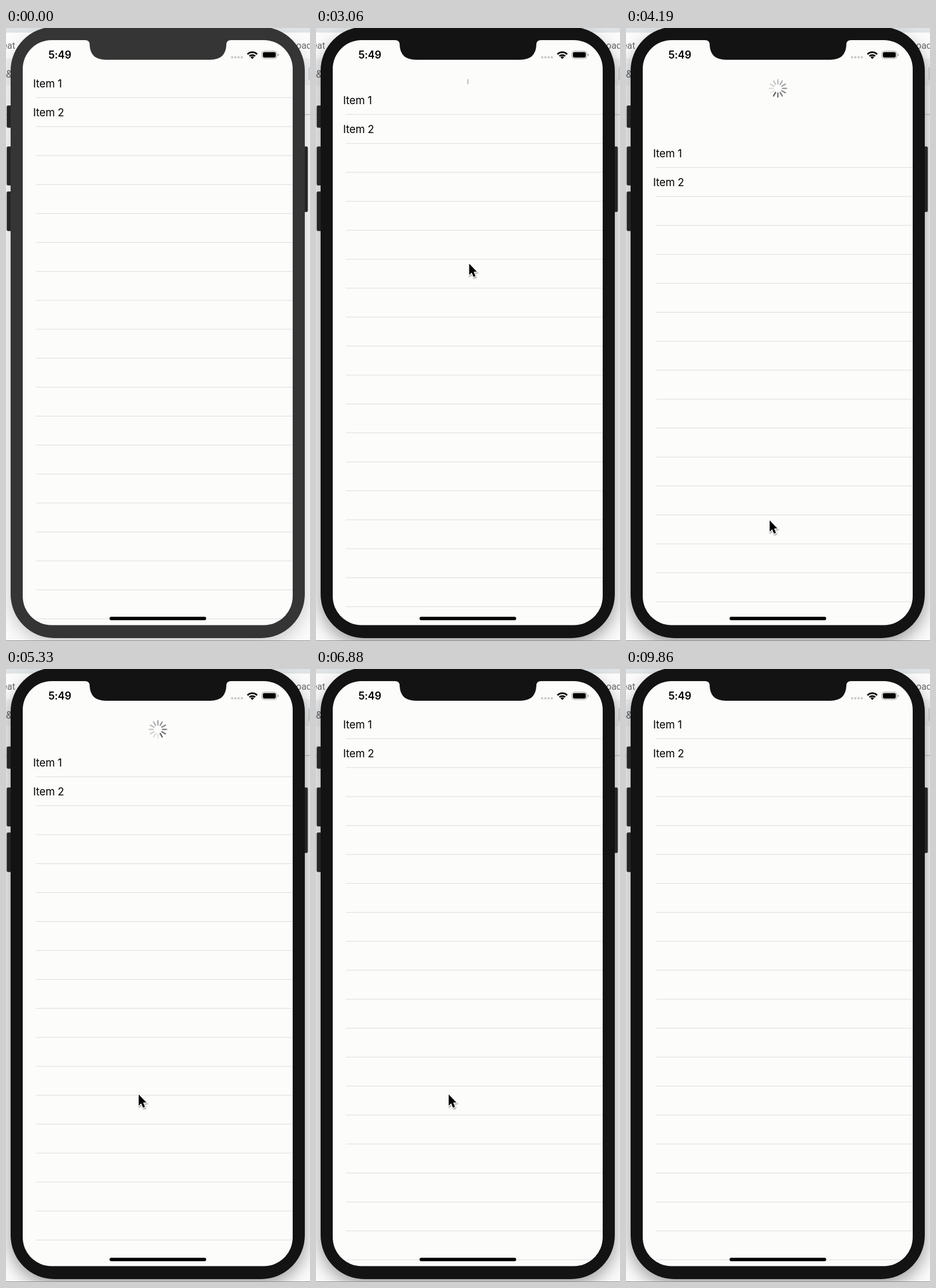
An HTML page that plays this animation: 527 by 1062 pixels, repeating every 9880 ms.

```html
<!DOCTYPE html>
<html lang="en">
<head>
<meta charset="utf-8">
<title>Pull to refresh</title>
<style>
  html, body { margin: 0; width: 100%; height: 100%; overflow: hidden; background: #fff; }
  svg { display: block; width: 100%; height: 100%; }
  .ui { font-family: Inter, "Liberation Sans", sans-serif; letter-spacing: -.2px; }
  .page { font-family: Roboto, Arial, sans-serif; fill: #686b6e; }
</style>
</head>
<body>
<svg viewBox="0 0 527 1062">
  <defs>
    <filter id="blur" x="-20%" y="-20%" width="140%" height="140%"><feGaussianBlur stdDeviation="15"/></filter>
    <filter id="soft" x="-50%" y="-50%" width="200%" height="200%"><feGaussianBlur stdDeviation="1"/></filter>
    <clipPath id="screenClip"><rect x="29" y="21" width="468" height="1013.5" rx="50"/></clipPath>
    <path id="arrow" d="M0 0V19.5L4.4 15.4L7.5 23L10.9 21.6L7.8 14.1H13.4Z"/>
  </defs>

  <!-- browser page behind the device -->
  <rect width="527" height="1062" fill="#fbfbfb"/>
  <rect width="527" height="8" fill="#dfe3e5"/>
  <rect y="53" width="527" height="46" fill="#f1f2f3"/>
  <path d="M0 150H527" stroke="#b5b5b5"/>
  <g class="page">
    <text x="16" y="36" font-size="16" text-anchor="end">eat</text>
    <text x="503" y="36" font-size="16">oad</text>
    <text x="11" y="86" font-size="18" text-anchor="end">.&amp;</text>
  </g>
  <rect x="524" y="68" width="3" height="22" fill="#d9dadb"/>
  <rect id="shadow" x="8" y="14" width="510" height="1052" rx="76" filter="url(#blur)"/>
  <path d="M0 1061.5H527" stroke="#8c8c8c"/>

  <!-- device -->
  <g fill="#242527" stroke="#4a4a4c" stroke-width=".8">
    <rect x="1.5" y="134.5" width="10" height="38" rx="2"/>
    <rect x="1.5" y="205.5" width="10" height="67" rx="2"/>
    <rect x="1.5" y="283.5" width="10" height="68" rx="2"/>
    <rect x="513" y="205.5" width="10" height="113" rx="2"/>
  </g>
  <rect id="bezel" x="8" y="-2" width="510" height="1059" rx="76"/>
  <g clip-path="url(#screenClip)">
    <rect x="29" y="21" width="468" height="1014" fill="#fcfcfb"/>
    <g id="spinner"></g>
    <g id="list" class="ui" font-size="18.6">
      <text x="47" y="103">Item 1</text>
      <text x="47" y="153">Item 2</text>
    </g>
    <rect x="179.5" y="1020" width="167.5" height="6" rx="3"/>
  </g>
  <path id="notch" d="M137 20V21Q145 21 145 29Q146 55 173 55H354Q381 55 382 29Q382 21 390 21V20Z"/>

  <!-- status bar -->
  <text class="ui" x="73.5" y="53" font-size="18" font-weight="600">5:49</text>
  <g id="dots" fill="#c6c6c8"></g>
  <g fill="none" stroke="#000" stroke-width="2.8">
    <path d="M418.6 45.4A12 12 0 0 1 435.4 45.4"/>
    <path d="M422 48.8A7.2 7.2 0 0 1 432 48.8"/>
  </g>
  <path d="M423.9 50.5A4.4 4.4 0 0 1 430.1 50.5L427 53.7Z"/>
  <rect x="443.5" y="40" width="26" height="13" rx="4" fill="none" stroke="#a2a2a2"/>
  <rect x="445.3" y="41.8" width="22.4" height="9.4" rx="2.4"/>
  <path d="M471 44.3Q473 45 473 46.5T471 48.7Z" fill="#a2a2a2"/>

  <g id="cursor">
    <use href="#arrow" x="1" y="2" opacity=".4" stroke="#000" stroke-width="2" filter="url(#soft)"/>
    <use href="#arrow" stroke="#fff" stroke-width="2.6" stroke-linejoin="round"/>
    <use href="#arrow"/>
  </g>
</svg>
<script>
const LOOP = 9880;
const FOCUS = 2400;
const DRAG = 2668, DRAG_END = 4190, RELEASE = 4460;
const SPIN = 3607, STEP = 1000 / 12;
const CLOSE = 5650, CLOSED = 6050;
const RESTING = 66;

const $ = id => document.getElementById(id);
const clamp = v => Math.min(1, Math.max(0, v));
const span = (t, a, b) => clamp((t - a) / (b - a));
const smooth = u => u * u * (3 - 2 * u);
const easeOut = u => 1 - (1 - u) ** 3;
const mix = (a, b, u) => a + (b - a) * u;

function add(parent, tag, attrs) {
  const el = document.createElementNS("http://www.w3.org/2000/svg", tag);
  for (const key in attrs) el.setAttribute(key, attrs[key]);
  return parent.appendChild(el);
}

for (let i = 0; i < 19; i++) {
  const y = 120.7 + 50.16 * i;
  add($("list"), "path", { d: `M52 ${y}H497`, stroke: "#dcdce0" });
}
for (let i = 0; i < 4; i++) add($("dots"), "circle", { cx: 392 + 5.6 * i, cy: 50.8, r: 2 });

const petals = Array.from({ length: 12 }, (_, i) => add($("spinner"), "path", {
  d: "M0 -15V-8", stroke: "#5c5c60", "stroke-width": 2.3,
  "stroke-linecap": "round", transform: `rotate(${30 * i})`
}));

// Cursor route: time, x, y; each leg is eased.
const route = [
  [1120, -30, 960], [1600, 266, 320], [DRAG, 266, 320], [DRAG_END, 249, 853],
  [4480, 249, 853], [5080, 230, 737], [8080, 230, 737], [8540, -30, 700]
];

function cursorAt(t) {
  let i = 0;
  while (i < route.length - 2 && t >= route[i + 1][0]) i++;
  const [t0, x0, y0] = route[i], [t1, x1, y1] = route[i + 1];
  const u = smooth(span(t, t0, t1));
  // the hand drifts sideways only late in the drag
  const ux = t0 === DRAG ? u * u : u;
  return [mix(x0, x1, ux), mix(y0, y1, u)];
}

function rubberBand(distance) {
  return 0.3618 * distance / (1 + 0.001114 * distance);
}

function pullAt(t) {
  if (t < DRAG) return 0;
  const pulled = rubberBand(533 * smooth(span(t, DRAG, DRAG_END)));
  if (t < RELEASE) return pulled;
  if (t < CLOSE) return mix(pulled, RESTING, easeOut(span(t, RELEASE, RELEASE + 420)));
  return RESTING * (1 - smooth(span(t, CLOSE, CLOSED)));
}

function drawSpinner(t, pull) {
  const closing = span(t, CLOSE, CLOSED);
  $("spinner").setAttribute("transform", `translate(263.3 104.7) scale(${1 - 0.7 * closing})`);
  $("spinner").setAttribute("opacity", 1 - closing);
  // the wheel stands still while the list is held at its lowest point
  const spinTime = t < DRAG_END ? t - SPIN : 7 * STEP + 1 + Math.max(0, t - RELEASE);
  const head = Math.floor(spinTime / STEP);
  const shown = (pull - 25) / 5.6;
  petals.forEach((petal, i) => {
    const age = (((head - i) % 12) + 12) % 12;
    const alpha = t < SPIN ? 0.5 * clamp(shown - i) : Math.max(0.12, 0.95 - 0.075 * age);
    petal.setAttribute("opacity", alpha);
  });
}

function draw(t) {
  const active = t >= FOCUS;
  for (const id of ["bezel", "notch"]) $(id).setAttribute("fill", active ? "#131313" : "#353535");
  $("shadow").setAttribute("opacity", active ? 0.4 : 0.2);

  const pull = pullAt(t);
  $("list").setAttribute("transform", `translate(0 ${pull.toFixed(2)})`);
  drawSpinner(t, pull);
  $("cursor").setAttribute("transform", `translate(${cursorAt(t).join(" ")})`);
}

const start = performance.now();
function tick() {
  draw((performance.now() - start) % LOOP);
  requestAnimationFrame(tick);
}
tick();
</script>
</body>
</html>
```
